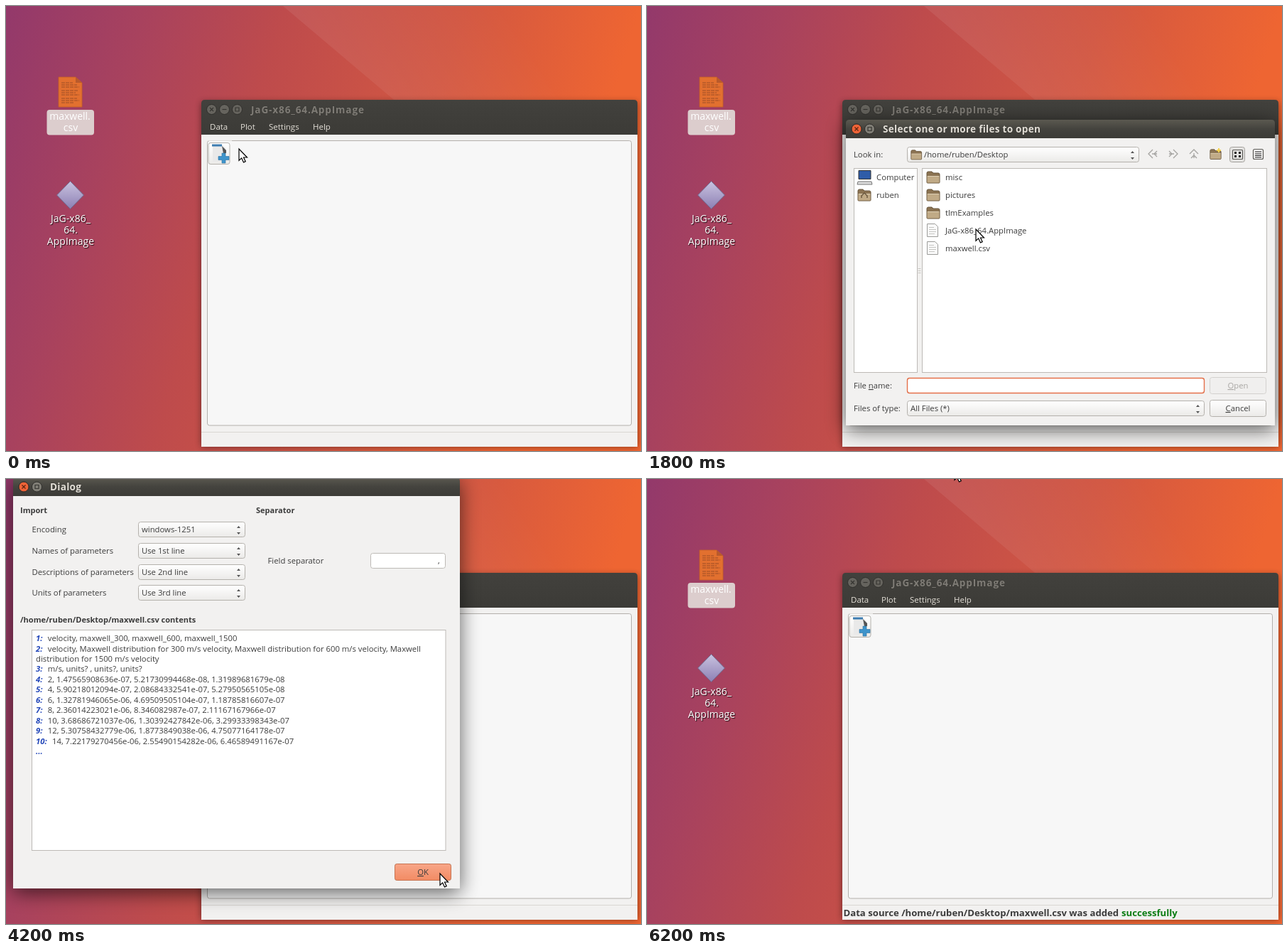
An HTML page that plays this animation: 894x626 px, repeating every 6500 ms.

```html
<!DOCTYPE html>
<html lang="en">
<head>
<meta charset="utf-8">
<title>Loading a data source</title>
<style>
html, body { margin: 0; width: 100%; height: 100%; overflow: hidden; background: #bf4b4c; }
svg { display: block; width: 100vw; height: 100vh; }
text { font: 11.3px "Open Sans", "Noto Sans", sans-serif; fill: #3c3c3c; white-space: pre; }
.mid { text-anchor: middle; }
.end { text-anchor: end; }
.dim { fill: #a9a7a4; }
.white { fill: #fff; }
.menu { font-size: 11.5px; fill: #e4e0d8; }
.bold { font-weight: 700; font-size: 11.05px; }
.status { font-weight: 700; font-size: 13.15px; }
.green { fill: #0b7d14; }
.num { font-weight: 700; font-style: italic; fill: #2145b8; }
.u { text-decoration: underline; }
.title { font-size: 13.6px; font-weight: 700; letter-spacing: .25px; fill: #e2ded6; stroke: #3a3935; stroke-width: 1px; paint-order: stroke; }
.wide { letter-spacing: .85px; }
.faded { fill: #7f7c76; }
.icon-label { font-size: 14px; fill: #fff; text-anchor: middle; }
.cast { text-shadow: 1px 1px 1px #000c; }
.shadow { filter: blur(14px); opacity: .62; }
.soft { filter: blur(5px); opacity: .45; }
.body { fill: #f2f1f0; }
.pane { fill: #f7f7f7; stroke: #b3b0ac; }
.list { fill: #fff; stroke: #bdbab6; }
.ctl { fill: url(#ctl); stroke: #b4b1ac; }
.off { fill: #f0efee; stroke: #d3d1ce; }
.hot { fill: url(#hot); stroke: #c77452; }
.focus { fill: none; stroke: #e5704a; stroke-width: 1.4px; }
.line { fill: none; stroke: #d6d4d0; }
.glyph { fill: none; stroke: #5c5b57; stroke-width: 1.2px; }
</style>
</head>
<body>
<svg id="stage" viewBox="0 0 894 626" preserveAspectRatio="none"></svg>
<script>
const HOME = "/home/ruben", FILE = HOME + "/Desktop/maxwell.csv";

const text = (x, y, s, cls = "") => `<text x="${x}" y="${y}" class="${cls}">${s}</text>`;
const rect = (x, y, w, h, cls, r = 0) => `<rect x="${x}" y="${y}" width="${w}" height="${h}" rx="${r}" class="${cls}"/>`;
const group = (cls, ...parts) => `<g class="${cls}">${parts.join("")}</g>`;
const path = (d, attrs) => `<path d="${d}" ${attrs}/>`;
const use = (id, x, y) => `<use href="#${id}" x="${x}" y="${y}"/>`;
const key = (before, letter, after) => `${before}<tspan class="u">${letter}</tspan>${after}`;
const gradient = (id, stops, box = 'x1="0" y1="0" x2="0" y2="1"') =>
  `<linearGradient id="${id}" ${box}>${stops.map(([at, color, alpha = 1]) =>
    `<stop offset="${at}" stop-color="${color}" stop-opacity="${alpha}"/>`).join("")}</linearGradient>`;

const button = (x, y, w, label, cls = "ctl", textCls = "") =>
  rect(x + .5, y + .5, w, 23, cls, 3) + text(x + w / 2 + .5, y + 16, label, "mid " + textCls);
const field = (x, y, w, label = "") => rect(x + .5, y + .5, w, 21, "list", 3) + text(x + 4, y + 15, label);
const combo = (x, y, w, label, pad = 5) =>
  rect(x + .5, y + .5, w, 21, "ctl", 3) + text(x + pad, y + 15, label) +
  path(`M${x + w - 11} ${y + 9}h5l-2.5-3zm0 6h5l-2.5 3z`, 'fill="#555"');
const bar = (x, y, w, h, fill) =>
  path(`M${x} ${y + h}v${5 - h}q0-5 5-5h${w - 10}q5 0 5 5v${h - 5}z`, `fill="url(#${fill})"`);

const ring = (x, y, fill) => `<circle cx="${x}" cy="${y}" r="7" fill="${fill}" stroke="#2f2e2b"/>`;
const cross = (x, y, color) => path(`M${x - 2.5} ${y - 2.5}l5 5m0-5l-5 5`, `stroke="${color}" stroke-width="1.2"`);
const closeButton = (x, y, on) => ring(x, y, on ? "#ee6337" : "#66645e") + cross(x, y, on ? "#5b2411" : "#363531");
const maxButton = (x, y, on) => ring(x, y, on ? "#807e76" : "#66645e") +
  path(`M${x - 2.5} ${y - 2.5}h5v5h-5z`, 'fill="none" stroke="#363531" stroke-width="1.2"');
const minButton = (x, y, on) => ring(x, y, on ? "#807e76" : "#66645e") +
  path(`M${x - 3} ${y}h6`, 'stroke="#363531" stroke-width="1.2"');

const dialog = (name, x, y, w, h, title, ...content) => group(name,
  rect(x, y + 6, w, h, "shadow"),
  group("deco", bar(x, y, w, 26, "barOn")),
  rect(x, y + 26, w, h - 26, "body"),
  closeButton(x + 15, y + 13), maxButton(x + 33.5, y + 13, true),
  group("deco", closeButton(x + 15, y + 13, true)),
  text(x + 52, y + 18, title, "title"), ...content);

const defs = `<defs>
${gradient("sky", [[0, "#93396b"], [.22, "#a8425e"], [.44, "#be4b4c"], [.72, "#d25742"], [1, "#ee6532"]],
  'gradientUnits="userSpaceOnUse" x1="0" y1="0" x2="820" y2="246"')}
${gradient("facet", [[0, "#fff", .07], [1, "#fff", 0]],
  'gradientUnits="userSpaceOnUse" x1="440" y1="45" x2="640" y2="-90"')}
${gradient("barOn", [[0, "#5b5950"], [.5, "#44433e"], [1, "#3c3b37"]])}
${gradient("barOff", [[0, "#42413d"], [1, "#3c3b37"]])}
${gradient("ctl", [[0, "#fff"], [1, "#ebeae8"]])}
${gradient("hot", [[0, "#f8a688"], [1, "#f28b64"]])}
${gradient("pickItem", [[0, "#f79166"], [1, "#e8683b"]])}
${gradient("gem", [[0, "#c9c3e0"], [1, "#8d80b4"]])}
<g id="folder">
  <path d="M1 3q0-2 2-2h5l2 2h7q2 0 2 2v11q0 1-1 1H2q-1 0-1-1z" fill="#8b7352" stroke="#66543b"/>
  <path d="M1.5 7h17v9.5h-17z" fill="#c0aa86"/><path d="M2 7.5h16" stroke="#ded0b5"/>
</g>
<g id="page">
  <path d="M1.5.5h11l4 4v14h-15z" fill="#fafafa" stroke="#9b9b98"/>
  <path d="M4 5.5h7m-7 3h10m-10 3h10m-10 3h8" stroke="#c5c5c2"/>
</g>
<g id="shut"><path d="M-4-4l8 8m0-8l-8 8" stroke="#555" stroke-width="3.6"/></g>
</defs>`;

const desktop = group("",
  rect(0, 0, 894, 626, "sky"),
  path("M390 0H894V426z", 'fill="url(#facet)"'),
  path("M74 100h24l9 8v34H74z", 'fill="#e2702f" stroke="#c35d28" stroke-width=".8"'),
  path("M98 100v8h9z", 'fill="#b95a2b"'),
  path("M78 108h16m-16 3h22m-22 3h25m-25 5h24m-24 3h20m-20 3h25m-25 5h22m-22 3h25m-25 3h17",
    'stroke="#9d4d25" stroke-width="1" stroke-dasharray="5 1"'),
  rect(57.5, 146, 66.5, 35.5, "label", 4),
  text(90, 160, "maxwell.", "icon-label"), text(91, 176, "csv", "icon-label"),
  path("M90.500 246.500l19 19.500-19 19.500-19-19.500z", 'fill="url(#gem)" stroke="#6d6487"'),
  ...["JaG-x86_", "64.", "AppImage"].map((s, i) => text(91, 304 + i * 16, s, "icon-label cast")));

const APP = "JaG-x86_64.AppImage";
const mainWindow = group("",
  rect(275, 135, 614, 485, "soft"),
  group("active", rect(275, 140, 614, 480, "shadow")),
  bar(275, 132, 614, 49, "barOff"),
  closeButton(289.5, 145.5), minButton(307.5, 145.5), maxButton(325.5, 145.5),
  text(345, 151, APP, "title wide faded"),
  group("active", bar(275, 132, 614, 49, "barOn"),
    closeButton(289.5, 145.5, true), minButton(307.5, 145.5, true), maxButton(325.5, 145.5, true),
    text(345, 151, APP, "title wide")),
  group("open", path("M280 181v-17q0-4 4-4h29q4 0 4 4v17z", 'fill="#5d5b54"')),
  text(287, 174, "Data", "menu"), text(330, 174, "Plot", "menu"),
  text(370, 174, "Settings", "menu"), text(432, 174, "Help", "menu"),
  rect(275, 181, 614, 439, "body"),
  rect(283.5, 189.5, 597, 400.5, "pane", 3),
  path("M284 189.500h34", 'stroke="#e2e0dd"'),
  rect(285, 192.5, 30, 30, "ctl", 3),
  path("M291 196h14l4 4v19h-18z", 'fill="#e9e9e9"'),
  path("M290 194.500h14v3h-14z", 'fill="#3d7cb0"'),
  path("M304 197l6 6v4h-4z", 'fill="#555"'),
  path("M304 207h5v4.500h5v5h-5v4.500h-5v-4.500h-5v-5h5z", 'fill="#3f94cb" stroke="#2b6f9f" stroke-width=".6"'),
  path("M275 599.500h614", 'stroke="#d9d7d3"'),
  group("added", text(276.5, 615, `Data source ${FILE} was added`, "status"),
    text(668, 615, "successfully", "status green")));

const menu = group("open",
  rect(281, 184, 248, 87, "soft"),
  rect(280.5, 180.5, 248, 87, "body"),
  path("M280.500 181v86.500h248V181", 'fill="none" stroke="#c4c2be"'),
  text(305, 195, "Load data source"), text(517, 195, "Ctrl+D", "end"),
  group("on-load", `<rect x="281" y="180.500" width="247.500" height="21" fill="url(#pickItem)" stroke="#d2572c"/>`,
    text(305, 195, "Load data source", "white"), text(517, 195, "Ctrl+D", "end white")),
  text(305, 217, "Edit data sources"), text(517, 217, "Ctrl+Shift+D", "end"),
  text(305, 239, "Save global event source as", "dim"),
  text(305, 261, "Save data in table"));

const chevrons = (x, turn) => `<g transform="translate(${x} 208) rotate(${turn})">` +
  path("M0-6l-6 6 6 6m6-10l-4 4 4 4M-1 0h7", 'fill="none" stroke="#a5a4a1" stroke-width="1.300"') + "</g>";

const files = ["misc", "pictures", "tlmExamples", APP, "maxwell.csv"];
const fileDialog = dialog("files", 280, 160, 604, 430, "Select one or more files to open",
  text(291, 213, "Look in:"), combo(366, 198, 326, HOME + "/Desktop", 24),
  `<use href="#folder" transform="translate(371 202) scale(.82)"/>`,
  chevrons(712, 0), chevrons(741, 180), chevrons(770, 90),
  `<use href="#folder" transform="translate(792 201) scale(.85)"/>`,
  path("M805 200v6m-3-3h6", 'stroke="#f5d34c" stroke-width="2"'),
  rect(820.5, 198.5, 21, 21, "pressed", 3), rect(824.5, 202.5, 14, 13, "glyph", 1),
  path("M827 205h3v3h-3zm6 0h3v3h-3zm-6 5h3v3h-3zm6 0h3v3h-3z", 'fill="#222"'),
  rect(853.5, 201.5, 14, 14, "glyph", 2),
  path("M856 205h9m-9 3h9m-9 2.500h9m-9 2.500h9", 'stroke="#222" stroke-width="1.200"'),
  rect(291.5, 228.5, 89, 287, "list"), rect(387.5, 228.5, 485, 287, "list"),
  path("M381.500 369.500h4m-4 3h4m-4 3h4", 'stroke="#c8c6c2"'),
  path("M298 231.500h17v12h-17z", 'fill="#2f5ca8" stroke="#333"'),
  path("M297 247h19l1 4h-21z", 'fill="#ddd" stroke="#777"'),
  text(323, 245, "Computer"), use("folder", 296, 257), text(323, 270, "ruben"),
  path("M302 270v-3l4-4 4 4v3", 'fill="none" stroke="#66543b" stroke-width="1.400"'),
  group("picked", rect(388, 329, 152.5, 24, "row")),
  ...files.map((s, i) => use(i < 3 ? "folder" : "page", 393, 232 + i * 25 - (i > 2)) + text(420, 245 + i * 25, s)),
  group("picked", path("M394 331h12l4 4v15h-16z", 'fill="#f28b64" opacity=".4"')),
  text(291, 538, key("File ", "n", "ame:")), field(366, 523, 418),
  group("unpicked", rect(366.5, 523.5, 418, 21, "focus", 3), button(792, 522, 79, key("", "O", "pen"), "off", "dim")),
  group("picked", text(370, 538, "maxwell.csv"), button(792, 522, 79, key("", "O", "pen"))),
  group("on-open", button(792, 522, 79, key("", "O", "pen"), "hot")),
  text(291, 570, "Files of type:"), combo(366, 555, 418, "All Files (*)"),
  button(792, 554, 79, key("", "C", "ancel")));

const csv = `velocity, maxwell_300, maxwell_600, maxwell_1500
velocity, Maxwell distribution for 300 m/s velocity, Maxwell distribution for 600 m/s velocity, Maxwell|distribution for 1500 m/s velocity
m/s, units? , units?, units?
2, 1.47565908636e-07, 5.21730994468e-08, 1.31989681679e-08
4, 5.90218012094e-07, 2.08684332541e-07, 5.27950565105e-08
6, 1.32781946065e-06, 4.69509505104e-07, 1.18785816607e-07
8, 2.36014223021e-06, 8.346082987e-07, 2.11167167966e-07
10, 3.68686721037e-06, 1.30392427842e-06, 3.29933398343e-07
12, 5.30758432779e-06, 1.8773849038e-06, 4.75077164178e-07
14, 7.22179270456e-06, 2.55490154282e-06, 6.46589491167e-07`;
const newLine = 'x="42" dy="14.45"';
const contents = csv.split("\n").map((s, i) =>
  `<tspan ${newLine} class="num">${i + 1}:</tspan><tspan dx="7.300">${s.replace("|", `</tspan><tspan ${newLine}>`)}</tspan>`
).join("") + `<tspan ${newLine} class="num">...</tspan>`;

const options = [["Encoding", "windows-1251"], ["Names of parameters", "Use 1st line"],
  ["Descriptions of parameters", "Use 2nd line"], ["Units of parameters", "Use 3rd line"]];
const importDialog = dialog("import", 10, -2, 629, 578, "Dialog",
  text(20, 48, "Import", "bold"), text(352, 48, "Separator", "bold"),
  ...options.map(([name, value], i) => text(36.5, 75 + i * 29.8, name) + combo(186, 60 + Math.round(i * 29.8), 150, value)),
  text(368.5, 119, "Field separator"), field(513, 104, 105), text(608, 119, ","),
  text(20, 202, `${FILE} contents`, "bold"),
  rect(36.5, 212.5, 582.5, 310, "list"),
  text(42, 213.6, contents),
  button(547, 541, 79, key("", "O", "K")),
  group("on-ok", button(547, 541, 79, key("", "O", "K"), "hot")));

const tab = (x, y, w, name) => path(`M${x}.5 251v${y - 248}q0-3 3-3h${w - 6}q3 0 3 3v${248 - y}`,
  `fill="${y < 222 ? "#f7f7f7" : "#e9e8e6"}" stroke="#bdbab6"`) +
  text(x + 7.5, y + 18, name) + use("shut", x + w - 17, y + 14);
const sourceDialog = dialog("sources", 390, 184, 384, 361, "Dialog",
  rect(400.5, 251, 362, 250.5, "pane", 2),
  tab(400, 223, 101, "maxwell.csv"), tab(501, 223, 114, "maxwell_1.csv"), tab(615, 220, 113, "maxwell_2.csv"),
  path("M616 251h112", 'stroke="#f7f7f7" stroke-width="1.500"'),
  text(411, 272, "Name"), text(495, 272, FILE),
  text(411, 297, "Alias"), field(495, 282, 256, "maxwell_2.csv"),
  text(411, 327, "Time deviation"), field(495, 312, 256, "0"),
  rect(414.5, 344.5, 12, 12, "list", 2), text(435, 355, "Use style"),
  rect(419.5, 376, 324, 87, "line"), button(430, 407, 303, "Add filter"),
  button(683, 509, 79, "Ok"), group("on-done", button(683, 509, 79, "Ok", "hot")));

const cursor = group("cursor", path("M0 0v16.300l3.700-3.400 2.800 6 2.700-1.200-2.700-5.700h5z",
  'fill="#fff" stroke="#000" stroke-width="1.200"'));

document.getElementById("stage").innerHTML =
  defs + desktop + mainWindow + menu + fileDialog + importDialog + sourceDialog + cursor;
for (const [cls, fill, stroke] of [["sky", "url(#sky)", "none"], ["label", "#dccdcd", "none"],
  ["row", "#dddcda", "none"], ["pressed", "#e4e3e1", "#a5a29e"]])
  document.querySelector("." + cls).style.cssText = `fill:${fill};stroke:${stroke}`;

const LOOP = 6500, STEP = 100, LEAD = 2;
function animate(name, toStyle, keys) {
  const frames = keys.map(([ms, ...value], i) => ({
    offset: Math.max(0, ms - LEAD) / LOOP,
    easing: `steps(${((keys[i + 1] || [LOOP])[0] - ms) / STEP})`,
    ...toStyle(...value)
  }));
  frames.push({ ...frames[frames.length - 1], offset: 1 });
  for (const el of document.querySelectorAll("." + name))
    el.animate(frames, { duration: LOOP, iterations: Infinity });
}
const fade = (name, ...keys) => animate(name, opacity => ({ opacity }), keys);
const appear = (name, ms) => fade(name, [0, 0], [ms - STEP, 0], [ms, 1]);

fade("active", [0, 0], [400, 0], [500, 1], [1200, 1], [1300, 0], [4900, 0], [5000, 1], [5900, 1], [6000, 0]);
fade("open", [0, 0], [500, 0], [600, 1], [1000, 1], [1200, 0]);
appear("on-load", 700);
fade("files", [0, 0], [1200, 0], [1500, 1], [3200, 1], [3300, .35], [3400, 0]);
appear("picked", 2100);
fade("unpicked", [0, 1], [2000, 1], [2100, 0]);
appear("on-open", 3000);
fade("import", [0, 0], [3200, 0], [3300, .45], [3400, 1], [4200, 1], [4500, 0]);
appear("on-ok", 4100);
appear("added", 4400);
fade("sources", [0, 0], [4400, 0], [4700, 1], [4900, 1], [5000, .8], [5100, .5], [5200, .2], [5300, 0]);
fade("sources .deco", [0, 1], [4900, 1], [5000, .4], [5100, .12], [5200, 0]);
appear("on-done", 4800);
animate("cursor", (x, y) => ({ transform: `translate(${x}px, ${y}px)` }), [
  [0, 328, 201], [100, 328, 201], [500, 303, 170], [600, 303, 172], [800, 314, 184], [900, 317, 186],
  [1300, 317, 186], [1700, 455, 281], [1800, 463, 314], [2000, 459, 349], [2400, 459, 349],
  [3100, 805, 543], [3500, 805, 543], [3900, 700, 521], [4200, 611, 555], [4600, 611, 555],
  [4900, 700, 525], [5200, 700, 525], [6100, 433, -15]]);
</script>
</body>
</html>
```
